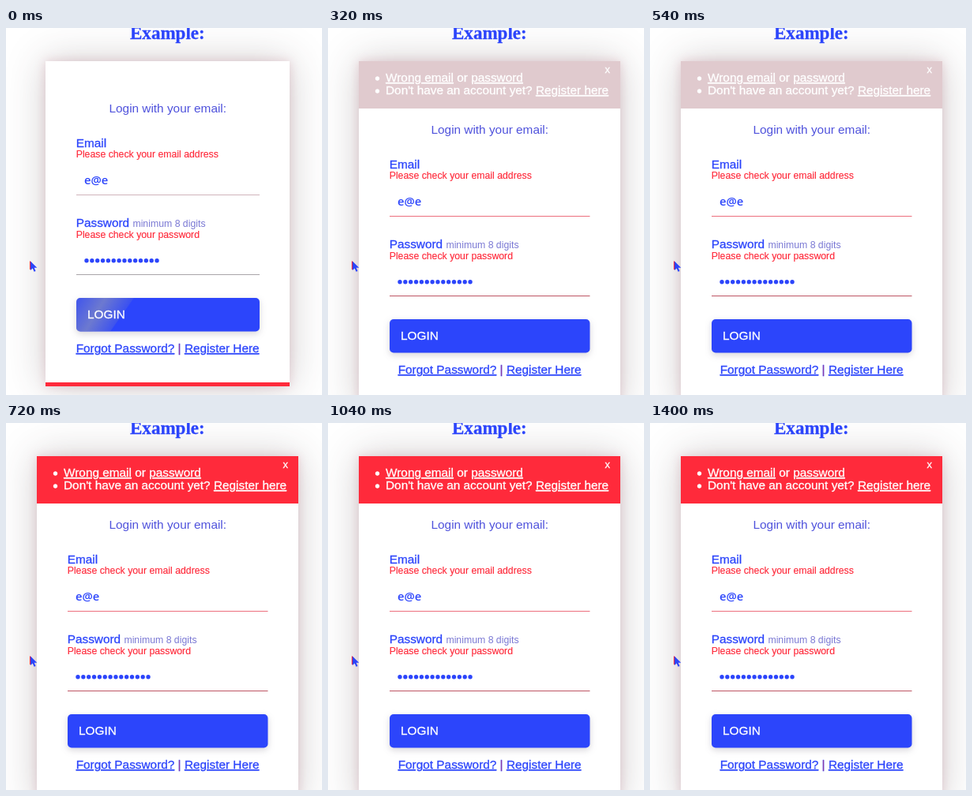
An HTML page that plays this animation: 400x465 px, repeating every 1420 ms.

```html
<!DOCTYPE html>
<html lang="en">
<head>
<meta charset="utf-8">
<title>Login form</title>
<style>
  :root { --blue: #2c45fb; --red: #ff2a3b; --loop: 1420ms; }
  html, body { margin: 0; width: 100%; height: 100%; overflow: hidden; background: #fff; }
  .stage { position: relative; width: 400px; height: 465px; overflow: hidden; }
  .card {
    position: absolute; box-sizing: border-box; left: 50px; top: 42px; width: 309px; height: 412px;
    background: #fff; border-bottom: 5px solid var(--red);
    box-shadow: 0 0 46px rgba(65, 50, 55, .25), 0 0 12px rgba(215, 140, 158, .32);
    animation: card var(--loop) step-end infinite;
  }
  svg { position: absolute; inset: 0; font: 15.36px "Liberation Sans", Arial, sans-serif; fill: var(--blue); }
  text { stroke: var(--blue); stroke-width: .3; }
  .heading { font: bold 23.04px "Liberation Serif", Times, serif; }
  .soft { fill: #4f52dc; stroke: none; }
  .hint { font-size: 12.29px; fill: #7a78d4; stroke: none; }
  .error { font-size: 12.29px; fill: var(--red); stroke: var(--red); stroke-width: .15; }
  .value { font: 600 14.8px "Open Sans", sans-serif; stroke: none; }
  .link { text-decoration: underline; }
  .white, .white text { fill: #fff; stroke: #fff; }
  .dots { stroke: var(--blue); stroke-width: 5.4; stroke-linecap: round; stroke-dasharray: 0 6.85; }

  .form { animation: drop var(--loop) step-end infinite; }
  .fields { animation: widen var(--loop) step-end infinite; }
  .wide { width: 232px; animation: stretch var(--loop) step-end infinite; }
  .mail { animation: stretch var(--loop) step-end infinite, mail var(--loop) step-end infinite; }
  .pass { animation: stretch var(--loop) step-end infinite, pass var(--loop) step-end infinite; }
  .button { filter: drop-shadow(0 3px 4px rgba(60, 50, 70, .2)); }
  .sheen { animation: hide var(--loop) step-end infinite; }
  .alert { animation: show var(--loop) step-end infinite; }
  .panel { stroke: none; fill: var(--red); animation: flash var(--loop) step-end infinite; }

  /* the alert opens at 90 ms (6.34%) */
  @keyframes card { 0% { left: 50px; width: 309px; height: 412px; } 6.34%, 100% { left: 39px; width: 331px; height: 440px; } }
  @keyframes drop { 0% { transform: none; } 6.34%, 100% { transform: translateY(27px); } }
  @keyframes widen { 0% { transform: none; } 6.34%, 100% { transform: translateX(-11px); } }
  @keyframes stretch { 0% { width: 232px; } 6.34%, 100% { width: 253.5px; } }
  @keyframes hide { 0% { opacity: 1; } 6.34%, 100% { opacity: 0; } }
  @keyframes show { 0% { opacity: 0; } 6.34%, 100% { opacity: 1; } }
  @keyframes flash { 0% { fill: var(--red); } 17.6% { fill: #e0cace; } 44.4%, 100% { fill: var(--red); } }
  @keyframes mail { 0% { fill: #d0b4bb; } 17.6%, 100% { fill: #ec6f7d; } }
  @keyframes pass { 0% { fill: #a9a4a8; } 17.6%, 100% { fill: #bd5563; } }
</style>
</head>
<body>
<div class="stage">
  <div class="card"></div>
  <svg width="400" height="465" viewBox="0 0 400 465">
    <defs>
      <linearGradient id="shine" x1="0" y1="0" x2="1" y2=".35">
        <stop offset="0" stop-color="#9096b8" stop-opacity=".2"/>
        <stop offset=".45" stop-color="#9096b8" stop-opacity=".65"/>
        <stop offset="1" stop-color="#9096b8" stop-opacity="0"/>
      </linearGradient>
    </defs>

    <text class="heading" x="157" y="14">Example:</text>

    <g class="form">
      <text class="soft" x="130.5" y="106.5">Login with your email:</text>
      <g class="fields">
        <text x="88.7" y="151">Email</text>
        <text class="error" x="88.7" y="164">Please check your email address</text>
        <text class="value" x="99" y="198">e@e</text>
        <rect class="wide mail" x="89" y="211" height="1"/>

        <text x="88.7" y="252">Password <tspan class="hint">minimum 8 digits</tspan></text>
        <text class="error" x="88.7" y="265.5">Please check your password</text>
        <path class="dots" d="M102 294.8h90"/>
        <rect class="wide pass" x="89" y="312" height="1"/>

        <g class="button">
          <rect class="wide" x="89" y="342" height="42.5" rx="5"/>
          <path class="sheen" d="M94 342h68l-30 42.5h-38q-5 0-5-5v-32.5q0-5 5-5z" fill="url(#shine)"/>
        </g>
        <text class="white" x="103" y="367.5">LOGIN</text>
      </g>
      <text x="88.7" y="411"><tspan class="link">Forgot Password?</tspan> <tspan fill="#9038a0">|</tspan> <tspan class="link">Register Here</tspan></text>
    </g>

    <g class="alert white">
      <rect class="panel" x="39" y="42" width="331" height="60"/>
      <circle cx="62.5" cy="64" r="2.3"/>
      <circle cx="62.5" cy="80" r="2.3"/>
      <text x="73" y="68"><tspan class="link">Wrong email</tspan> or <tspan class="link">password</tspan></text>
      <text x="73" y="84">Don't have an account yet? <tspan class="link">Register here</tspan></text>
      <text x="350.5" y="56.5" font-size="13">x</text>
    </g>

    <path d="M30 295v11.5l2.5-2.2v-7z" fill="#ff2a3b"/>
    <path d="M31 295.5v11.5l2.7-2.4 1.9 4.2 2-.9-1.9-4.1h3.6z"/>
  </svg>
</div>
</body>
</html>
```
